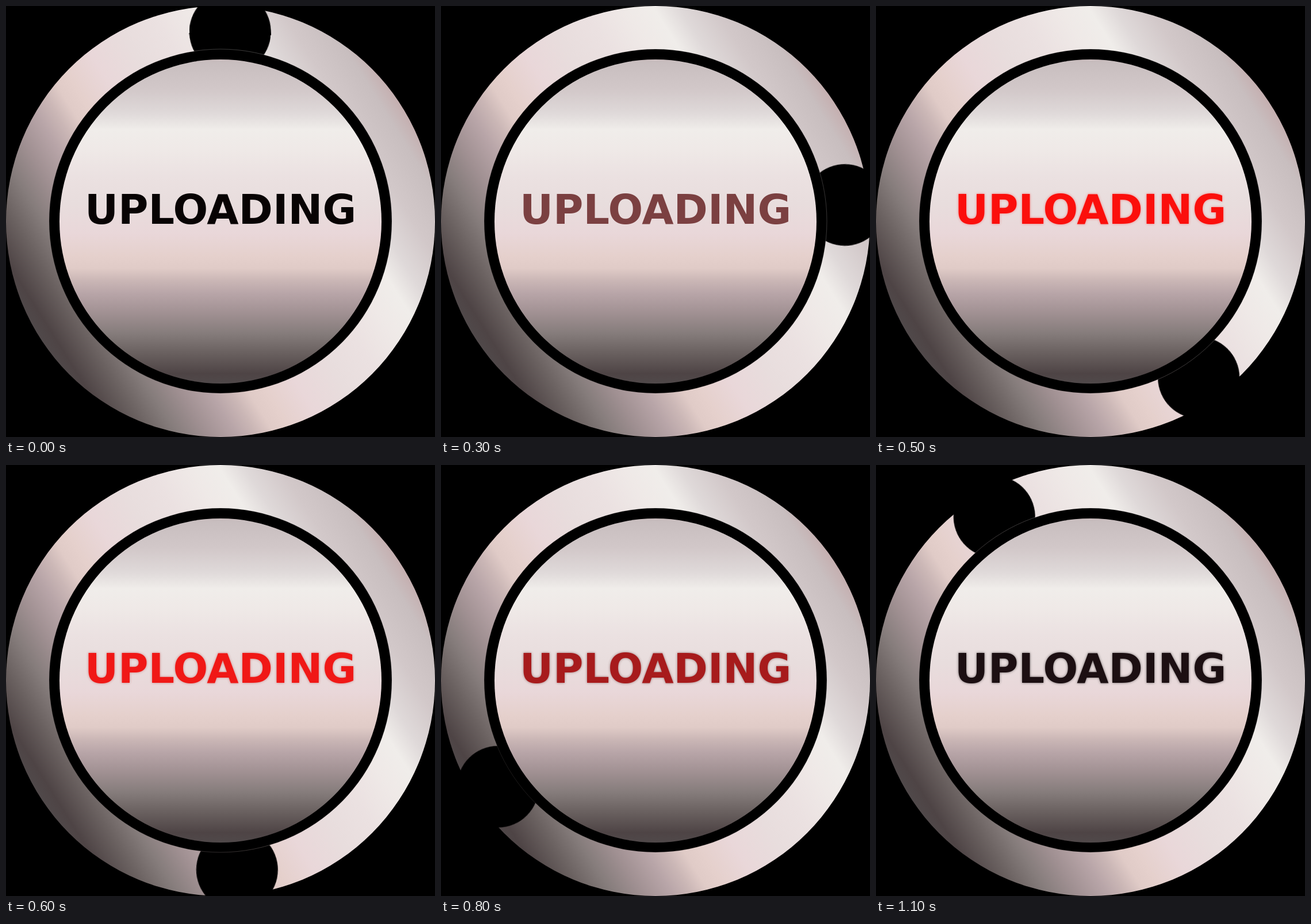
These frames come from a looping animation (746x750 px, 1.2 s). An HTML page:

```html
<!DOCTYPE html>
<html lang="en">
<head>
<meta charset="utf-8">
<title>Uploading</title>
<style>
  html, body { margin: 0; width: 100%; height: 100%; overflow: hidden; background: #000; }
  svg { display: block; width: 746px; height: 750px; }
  .notch {
    transform-origin: 373px 375px;
    animation: orbit 1.2s step-end infinite;
  }
  .label {
    font: bold 71.5px "DejaVu Sans", sans-serif;
    text-anchor: middle;
    animation: heat 1.2s step-end infinite;
  }
  @keyframes orbit {
    0%      { transform: rotate(2.9deg); }
    8.333%  { transform: rotate(32.9deg); }
    16.667% { transform: rotate(59deg); }
    25%     { transform: rotate(85deg); }
    33.333% { transform: rotate(115deg); }
    41.667% { transform: rotate(145.3deg); }
    50%     { transform: rotate(175deg); }
    58.333% { transform: rotate(205.1deg); }
    66.667% { transform: rotate(236deg); }
    75%     { transform: rotate(267deg); }
    83.333% { transform: rotate(298deg); }
    91.667% { transform: rotate(329.6deg); }
  }
  @keyframes heat {
    0%      { fill: #080303; filter: none; }
    8.333%  { fill: #413033; filter: none; }
    16.667% { fill: #5e383a; filter: none; }
    25%     { fill: #7b4041; filter: none; }
    33.333% { fill: #bb2827; filter: none; }
    41.667% { fill: #fb0f0c; filter: drop-shadow(0 0 2px #f006); }
    50%     { fill: #f01816; filter: drop-shadow(0 0 2px #a006); }
    58.333% { fill: #dd2020; filter: drop-shadow(0 0 2px #6006); }
    66.667% { fill: #a71b1c; filter: drop-shadow(0 0 2px #4007); }
    75%     { fill: #701517; filter: drop-shadow(0 0 2px #2008); }
    83.333% { fill: #461214; filter: drop-shadow(0 0 2px #1008); }
    91.667% { fill: #1c0f12; filter: drop-shadow(0 0 2px #0008); }
  }
</style>
</head>
<body>
<svg viewBox="0 0 746 750">
  <defs>
    <linearGradient id="metal">
      <stop offset="0" stop-color="#c5afb0"/>
      <stop offset=".04" stop-color="#c8bebf"/>
      <stop offset=".12" stop-color="#d2c8c9"/>
      <stop offset=".19" stop-color="#dfd9d9"/>
      <stop offset=".24" stop-color="#f0edea"/>
      <stop offset=".30" stop-color="#efe9e7"/>
      <stop offset=".38" stop-color="#ebe1e1"/>
      <stop offset=".46" stop-color="#e8dddd"/>
      <stop offset=".55" stop-color="#e9d7d9"/>
      <stop offset=".62" stop-color="#e5d0cc"/>
      <stop offset=".655" stop-color="#e0cbc7"/>
      <stop offset=".69" stop-color="#cbb7b6"/>
      <stop offset=".73" stop-color="#b8a5a8"/>
      <stop offset=".79" stop-color="#a09092"/>
      <stop offset=".85" stop-color="#857c7b"/>
      <stop offset=".905" stop-color="#6b6261"/>
      <stop offset=".97" stop-color="#4e4445"/>
      <stop offset="1" stop-color="#50494a"/>
    </linearGradient>
    <linearGradient id="face" href="#metal" gradientUnits="userSpaceOnUse" x1="0" y1="76" x2="0" y2="657"/>
    <linearGradient id="rim" href="#metal" gradientUnits="userSpaceOnUse" x1="690" y1="177" x2="56" y2="573"/>
  </defs>
  <rect width="746" height="750"/>
  <ellipse cx="373" cy="375" rx="373" ry="375" fill="url(#rim)"/>
  <circle class="notch" cx="373" cy="44.5" r="71"/>
  <ellipse cx="373" cy="374.5" rx="298" ry="299.5" stroke="url(#rim)" stroke-width=".5" stroke-opacity=".5"/>
  <ellipse cx="373" cy="375" rx="280" ry="282" fill="url(#face)"/>
  <text class="label" x="373" y="379">UPLOADING</text>
</svg>
</body>
</html>
```
